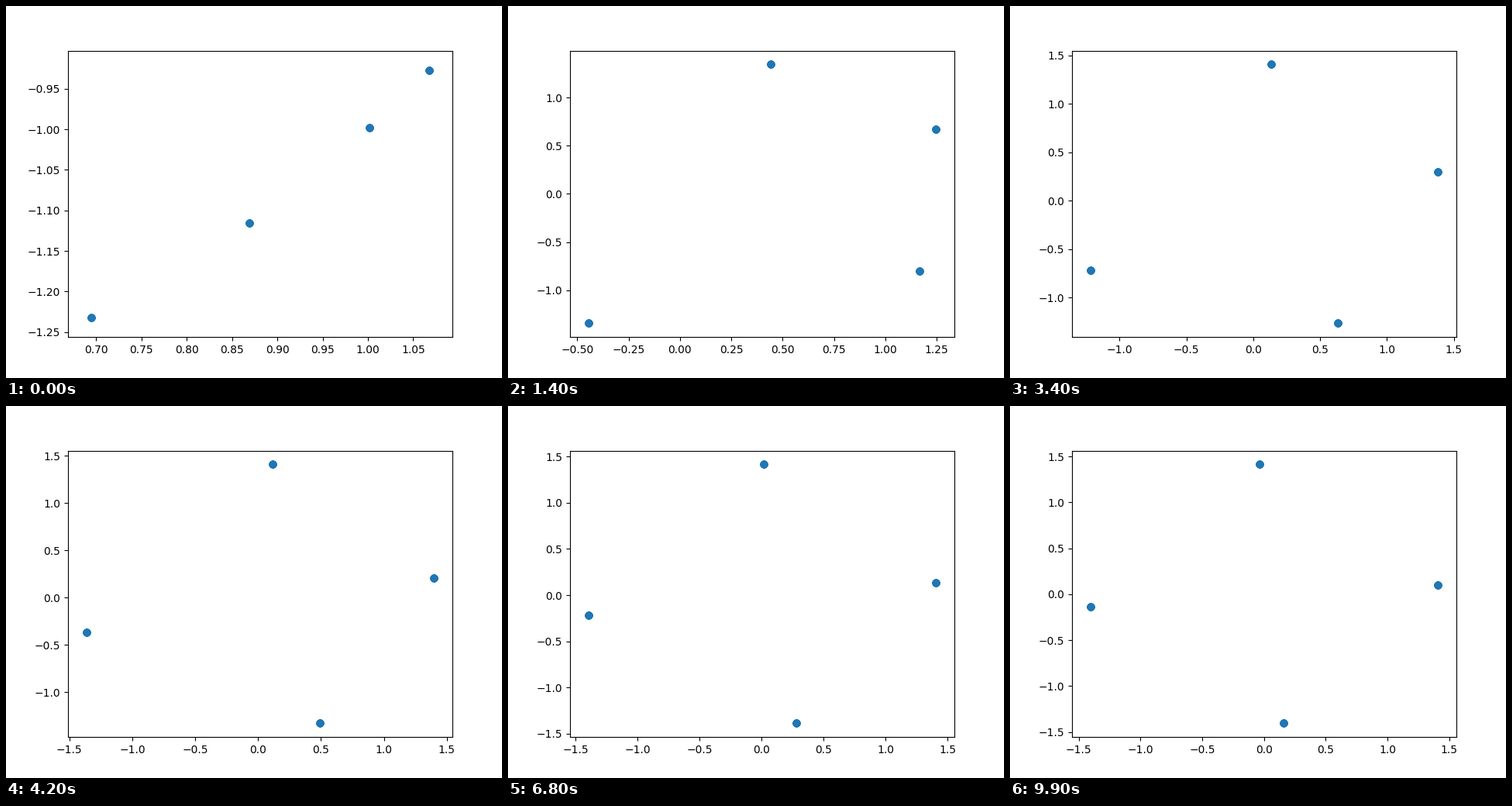
Write a matplotlib script that moves like this. It is 640x480 px and loops after 10000 ms.

```python
import numpy as np
import matplotlib.pyplot as plt
from matplotlib.animation import FuncAnimation

FRAMES, INTERVAL = 100, 100
RADIUS = np.sqrt(2)
LAYERS = 40         # stacked markers give the dots their crisp rim
MARGIN = 0.05

# Key angles in degrees on the way apart, one row per particle
STOPS = [0, 14, 26, 42]
PATHS = [[-60.6, -108.3, -134.1, -164.9],
         [-52.06, -34.36, -57.0, -69.8],
         [-44.88, 28.25, 15.76, 8.33],
         [-40.96, 71.7, 83.96, 85.25]]

# The particles come to rest on a slightly turned square
REST = np.arange(-180, 180, 90) + 3
SETTLE = 36


def positions(i):
    burst, end = STOPS[1], STOPS[-1]
    clock = burst * (1 - (1 - i / burst) ** 1.5) if i < burst else i
    deg = np.array([np.interp(clock, STOPS, path) for path in PATHS])
    if i > end:
        deg = REST + (deg - REST) * np.exp((end - i) / SETTLE)
    a = np.radians(deg)
    return RADIUS * np.column_stack([np.cos(a), np.sin(a)])


def limits(v, pad):
    lo, hi = v.min() - pad, v.max() + pad
    extra = MARGIN * (hi - lo)
    return lo - extra, hi + extra


fig, ax = plt.subplots(figsize=(6.4, 4.8), dpi=100)
blank = np.zeros(4 * LAYERS)
dots = ax.scatter(blank, blank, color="C0")
# Padding of 3 px measured on a unit-sized axes
pad_x, pad_y = 3 / (ax.get_position().size * fig.bbox.size)


def update(i):
    p = positions(i)
    dots.set_offsets(np.tile(p, (LAYERS, 1)))
    ax.set_xlim(limits(p[:, 0], pad_x))
    ax.set_ylim(limits(p[:, 1], pad_y))
    return dots,


anim = FuncAnimation(fig, update, frames=FRAMES, interval=INTERVAL,
                     init_func=lambda: update(0), repeat=True, repeat_delay=0)
plt.show()
```
